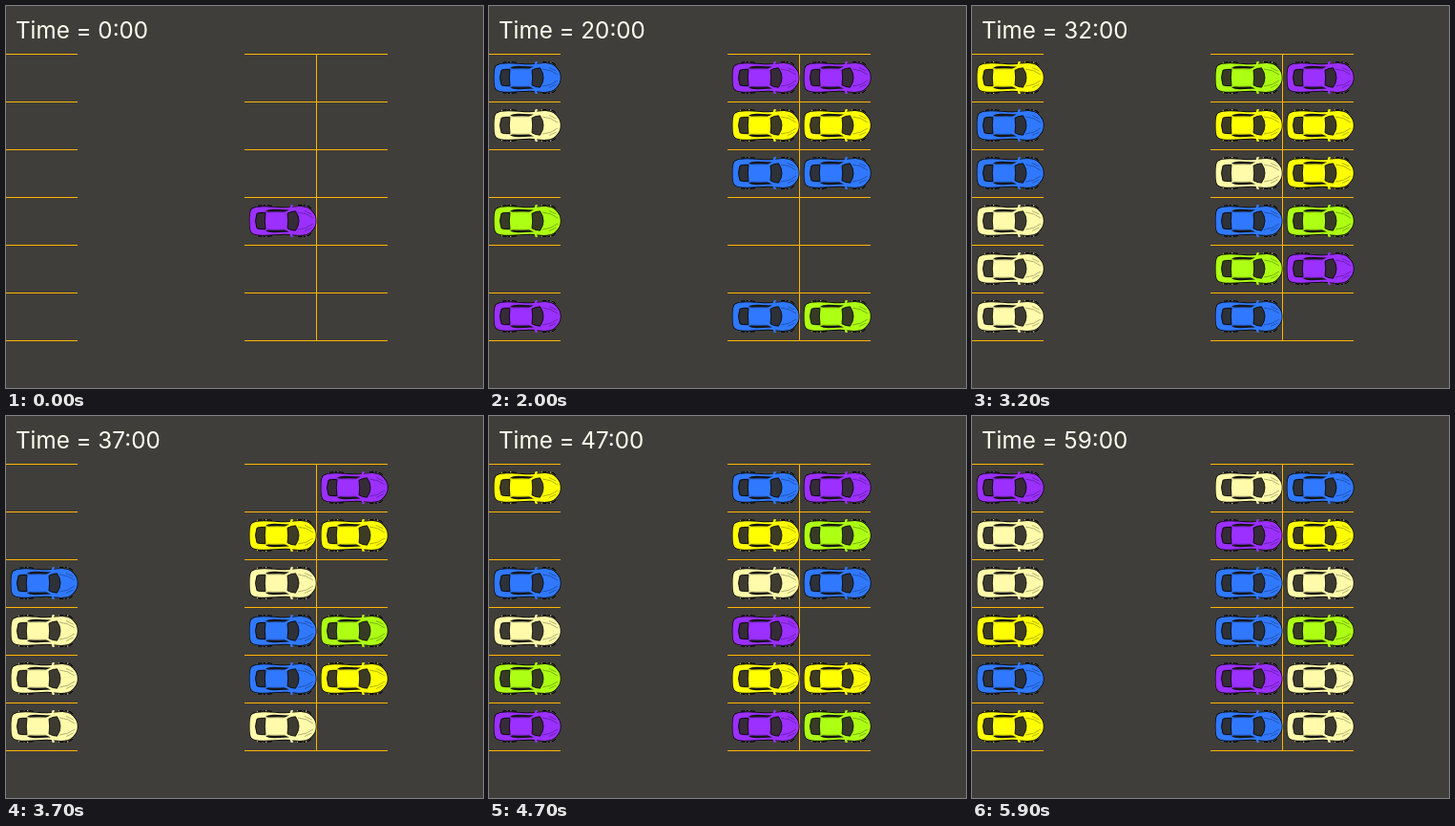
These frames come from a looping animation (500x400 px, 6 s). An HTML page with a canvas:

```html
<!DOCTYPE html>
<html lang="en">
<head>
<meta charset="utf-8">
<title>Car park</title>
<style>
  html, body { margin: 0; width: 100%; height: 100%; overflow: hidden; background: #403e3a; }
  canvas { display: block; }
</style>
</head>
<body>
<canvas id="stage" width="500" height="400"></canvas>
<script>
const ctx = document.getElementById('stage').getContext('2d');
const TICK = 100, TICKS = 60;
const PAINT = { p: '#9b30ff', b: '#3079ff', y: '#ffff00', c: '#fffbaa', g: '#adff14' };
const COLUMNS = [0, 250, 325];

// Bays per column from top to bottom; '-' is an empty bay.
const STATES = [
  [0, '------' + '---p--' + '------'],
  [10, 'bybbb-' + 'byp-pc' + 'ypbcbg'],
  [20, 'bc-g-p' + 'pyb--b' + 'pyb--g'],
  [26, 'ybg-yc' + 'gybpgb' + 'pyycpc'],
  [37, '--bccc' + '-ycbbc' + 'py-gy-'],
  [47, 'y-bcgp' + 'bycpyp' + 'pgb-yg'],
  [59, 'pccyby' + 'cpbbpb' + 'bycgcc']
];

function random(seed) {
  const v = Math.sin(seed * 12.9898 + 4.137) * 43758.5453;
  return v - Math.floor(v);
}

// A bay whose car changes stands empty for a moment in between.
function carAt(bay, tick) {
  let k = STATES.length - 1;
  while (STATES[k][0] > tick) k--;
  const [start, now] = STATES[k];
  const from = now[bay];
  if (k === STATES.length - 1) return from;
  const [end, later] = STATES[k + 1];
  const to = later[bay];
  if (from === to) return from;
  const seed = bay + k * 18;
  const leave = start + 1 + Math.floor(random(seed) * (end - start));
  const arrive = from === '-' ? leave : Math.min(end, leave + 1 + Math.floor(random(seed + 500) * 2));
  if (tick < leave) return from;
  return tick < arrive ? '-' : to;
}

function shape(d) { return new Path2D(d); }

const BODY = shape('M.5 18C.5 12 .8 8 2.5 5.8C5 3.6 10 3 17 3.2C25 3.4 31 4.4 38 4.3' +
  'C45 4 49 2.8 56 3.2C61 3.6 64.5 5.5 67 9.5C69.2 12 69.8 15 69.8 18' +
  'C69.8 21 69.2 24 67 26.5C64.5 30.5 61 32.4 56 32.8C49 33.2 45 32 38 31.7' +
  'C31 31.6 25 32.6 17 32.8C10 33 5 32.4 2.5 30.2C.8 28 .5 24 .5 18Z');
const REAR_GLASS = shape('M8 10.2Q11 9 17 9.6Q15.6 18 17 26.4Q11 27 8 25.8Q5 18 8 10.2Z');
const WINDSCREEN = shape('M40 10.2Q43.5 8 48.5 7.8Q55.5 18 48.5 28.2Q43.5 28 40 25.8Q41.4 18 40 10.2Z');
const SIDE_GLASS = shape('M17 7.4Q21 5.4 27 5.8L42 6.6L37.5 8.4Q27 8 20 8.6Z');
const SEAMS = shape('M9 9.6L17 8.8H37M51 9Q60 9.5 67 15M58 7.5L65.5 11');
const MIRROR = shape('M42.5 4.2L43.8 1L46 1.3L45 4Z');
const SILL = shape('M8 2.4Q17 .8 24 2.4M50 1.8Q57 .8 63 3L66 6.2');

function halves(draw) {
  draw();
  ctx.save();
  ctx.translate(0, 36);
  ctx.scale(1, -1);
  draw();
  ctx.restore();
}

function drawCar(x, y, paint) {
  ctx.save();
  ctx.translate(x, y);
  ctx.strokeStyle = '#000';
  ctx.fillStyle = paint;
  ctx.lineWidth = 1.4;
  ctx.stroke(BODY);
  ctx.fill(BODY);
  halves(() => {
    ctx.lineWidth = 1;
    ctx.setLineDash([5, 2, 2, 2]);
    ctx.strokeStyle = '#000';
    ctx.stroke(SILL);
    ctx.setLineDash([1, 8]);
    ctx.strokeStyle = paint;
    ctx.stroke(SILL);
    ctx.setLineDash([]);
    ctx.fillStyle = paint;
    ctx.fill(MIRROR);
    ctx.lineWidth = 0.5;
    ctx.strokeStyle = 'rgba(0,0,0,.6)';
    ctx.stroke(SEAMS);
    ctx.fillStyle = '#171615';
    ctx.fill(SIDE_GLASS);
  });
  ctx.fillStyle = 'rgba(46,44,40,.93)';
  ctx.strokeStyle = '#000';
  ctx.lineWidth = 0.8;
  for (const glass of [REAR_GLASS, WINDSCREEN]) {
    ctx.fill(glass);
    ctx.stroke(glass);
  }
  ctx.restore();
}

function drawLines() {
  ctx.fillStyle = '#ffb400';
  ctx.fillRect(325, 50, 1, 300);
  for (let y = 50; y <= 350; y += 50) {
    ctx.fillRect(0, y, 75, 1);
    ctx.fillRect(250, y, 150, 1);
  }
}

function draw(tick) {
  ctx.fillStyle = '#403e3a';
  ctx.fillRect(0, 0, 500, 400);
  drawLines();
  for (let bay = 0; bay < 18; bay++) {
    const car = carAt(bay, tick);
    if (car !== '-') drawCar(COLUMNS[Math.floor(bay / 6)] + 5, 57 + (bay % 6) * 50, PAINT[car]);
  }
  ctx.fillStyle = '#fffff0';
  ctx.font = '24.2px Inter, sans-serif';
  ctx.fillText(`Time = ${tick}:00`, 10, 34);
}

const begin = performance.now();
function frame() {
  draw(Math.floor((performance.now() - begin) / TICK) % TICKS);
  requestAnimationFrame(frame);
}
frame();
</script>
</body>
</html>
```
